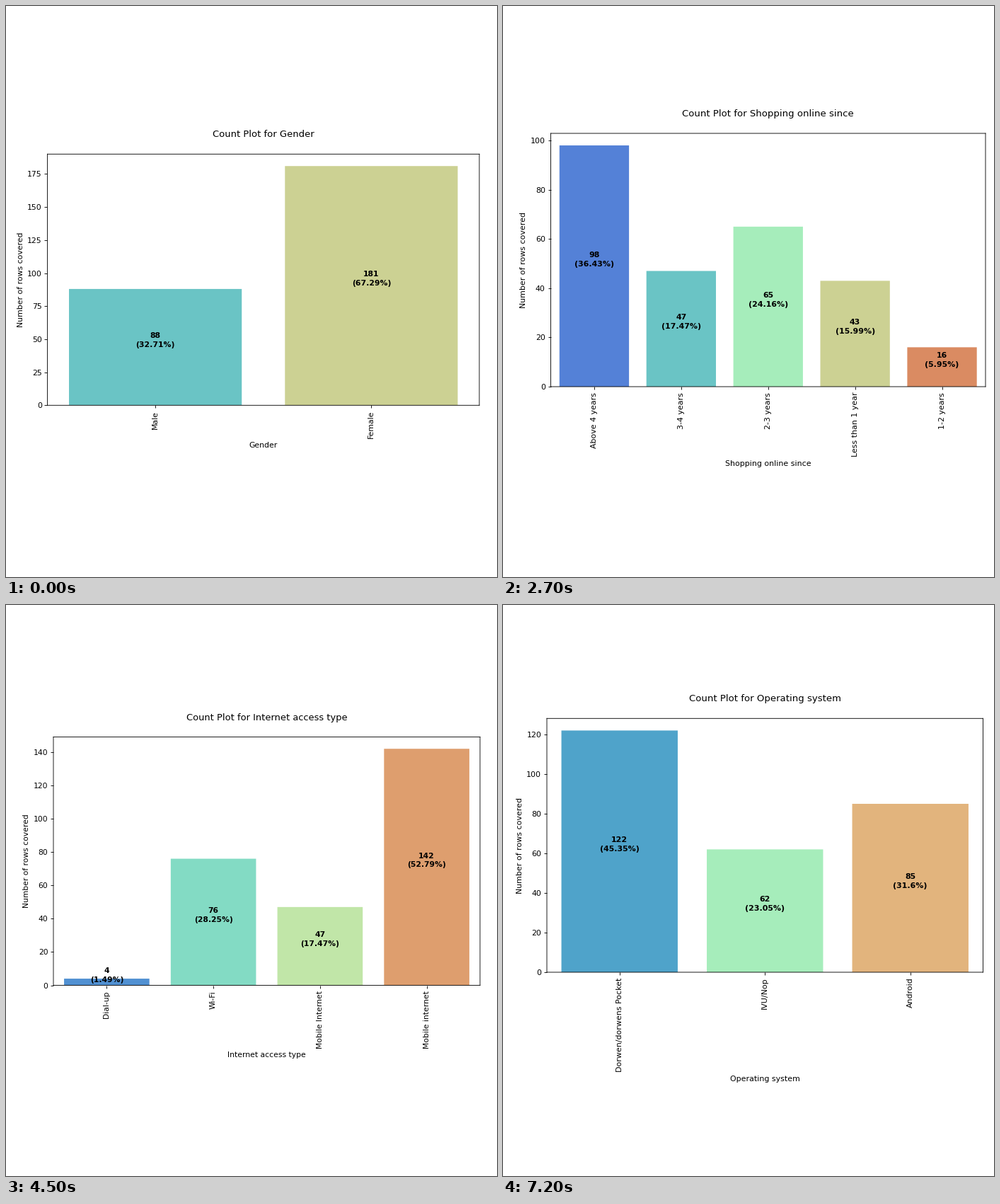
A matplotlib script that plays this animation: 694 by 807 pixels, repeating every 8000 ms.

```python
import colorsys

import matplotlib.pyplot as plt
import numpy as np
from matplotlib.animation import FuncAnimation

W, H, DPI = 694, 807, 64
FRAMES, INTERVAL, HOLD = 80, 100, 9
TOTAL = 269

plt.rcParams["font.family"] = "DejaVu Sans"

# column, (left, top, right, bottom) in pixels, tick step, {category: count}
CHARTS = [
    ("Gender", (58.5, 209.3, 669, 564.3), 25,
     {"Male": 88, "Female": 181}),
    ("Age", (50.3, 167.5, 677, 533), 10,
     {"31-40 years": 81, "21-30 years": 79, "41-50 yaers": 70,
      "Less than 20 years": 20, "51 years and above": 19}),
    ("City", (55.4, 190.8, 675.8, 552.4), 10,
     {"Delhi": 58, "Greater Noida": 43, "Karnal": 27, "Bangalore": 37,
      "Noida": 40, "Solan": 18, "Moradabad": 5, "Gurgaon": 12,
      "Merrut": 9, "Ghaziabad": 18, "Bulandshahr": 2}),
    ("Shopping online since", (67.5, 180, 682, 538), 20,
     {"Above 4 years": 98, "3-4 years": 47, "2-3 years": 65,
      "Less than 1 year": 43, "1-2 years": 16}),
    ("Onine purchase in past 1 year", (57.3, 169, 682.5, 532.3), 20,
     {"31-40 times": 63, "41 times and above": 47,
      "Less than 10 times": 114, "11-20 times": 29,
      "21-30 times": 10, "42 times and above": 6}),
    ("Internet access type", (67, 186.5, 670, 537.5), 20,
     {"Dial-up": 4, "Wi-Fi": 76, "Mobile Internet": 47,
      "Mobile internet": 142}),
    ("Device used for internet access", (71, 202.6, 669.5, 550.5), 20,
     {"Desktop": 30, "Smartphone": 141, "Tablet": 12, "Laptop": 86}),
    ("Screen size of device", (63.5, 201, 674, 556), 20,
     {"Others": 134, "4.7 inches": 29, "5.5 inches": 99, "5 inches": 7}),
    ("Operating system", (62, 160.3, 678.5, 519), 20,
     {"Dorwen/dorwens Pocket": 122, "IVU/Nop": 62, "Android": 85}),
]

WIDE_GAMUT = np.array([[0.8225, 0.1774, 0.0],
                       [0.0332, 0.9669, 0.0],
                       [0.0171, 0.0724, 0.9108]])


def to_display(rgb):
    """Convert sRGB to the look of a wide-gamut screen."""
    c = np.array(rgb)
    linear = np.where(c <= 0.04045, c / 12.92, ((c + 0.055) / 1.055) ** 2.4)
    c = WIDE_GAMUT @ linear
    c = np.where(c <= 0.0031308, c * 12.92, 1.055 * c ** (1 / 2.4) - 0.055)
    return tuple(np.clip(c, 0, 1))


def bar_colors(n):
    cmap = plt.get_cmap("rainbow")
    colors = []
    for x in np.linspace(0, 1, n + 2)[1:-1]:
        h, l, s = colorsys.rgb_to_hls(*cmap(x)[:3])
        colors.append(to_display(colorsys.hls_to_rgb(h, l, s * 0.75)))
    return colors


def draw_chart(fig, column, box, step, data):
    left, top, right, bottom = box
    ax = fig.add_axes([left / W, 1 - bottom / H,
                       (right - left) / W, (bottom - top) / H])
    unit = (right - left) / 558 * 72 / DPI
    names, counts = list(data), list(data.values())
    n, peak = len(names), max(counts)

    # Without snapping, edges keep their soft sub-pixel places.
    ax.bar(range(n), counts, width=0.8, color=bar_colors(n), linewidth=0,
           snap=False)
    for i, count in enumerate(counts):
        share = round(100 * count / TOTAL, 2)
        ax.text(i, count / 2, f"{count}\n({share}%)", ha="center",
                va="baseline", fontsize=10 * unit, fontweight="bold",
                linespacing=1.35)

    ax.set_xlim(-0.5, n - 0.5)
    ax.set_ylim(0, peak * 1.05)
    ax.set_xticks(range(n), names, rotation=90)
    ax.set_yticks(np.arange(0, peak * 1.05, step).astype(int))
    ax.tick_params(labelsize=10 * unit, length=3.5 * unit,
                   width=0.8 * unit, pad=3.5 * unit)
    for spine in ax.spines.values():
        spine.set(linewidth=0.8 * unit, snap=False)
    ax.set_xlabel(column, fontsize=10 * unit, labelpad=4 * unit)
    ax.set_ylabel("Number of rows covered", fontsize=10 * unit,
                  labelpad=4 * unit)
    ax.set_title(f"Count Plot for {column}", fontsize=12 * unit,
                 pad=22 * unit)
    return ax


fig = plt.figure(figsize=(W / DPI, H / DPI), dpi=DPI, facecolor="white")
axes = [draw_chart(fig, *chart) for chart in CHARTS]


def update(frame):
    for i, ax in enumerate(axes):
        ax.set_visible(i == frame // HOLD)
    return axes


update(0)
anim = FuncAnimation(fig, update, frames=FRAMES, interval=INTERVAL,
                     repeat=True, repeat_delay=0, blit=False)
plt.show()
```
